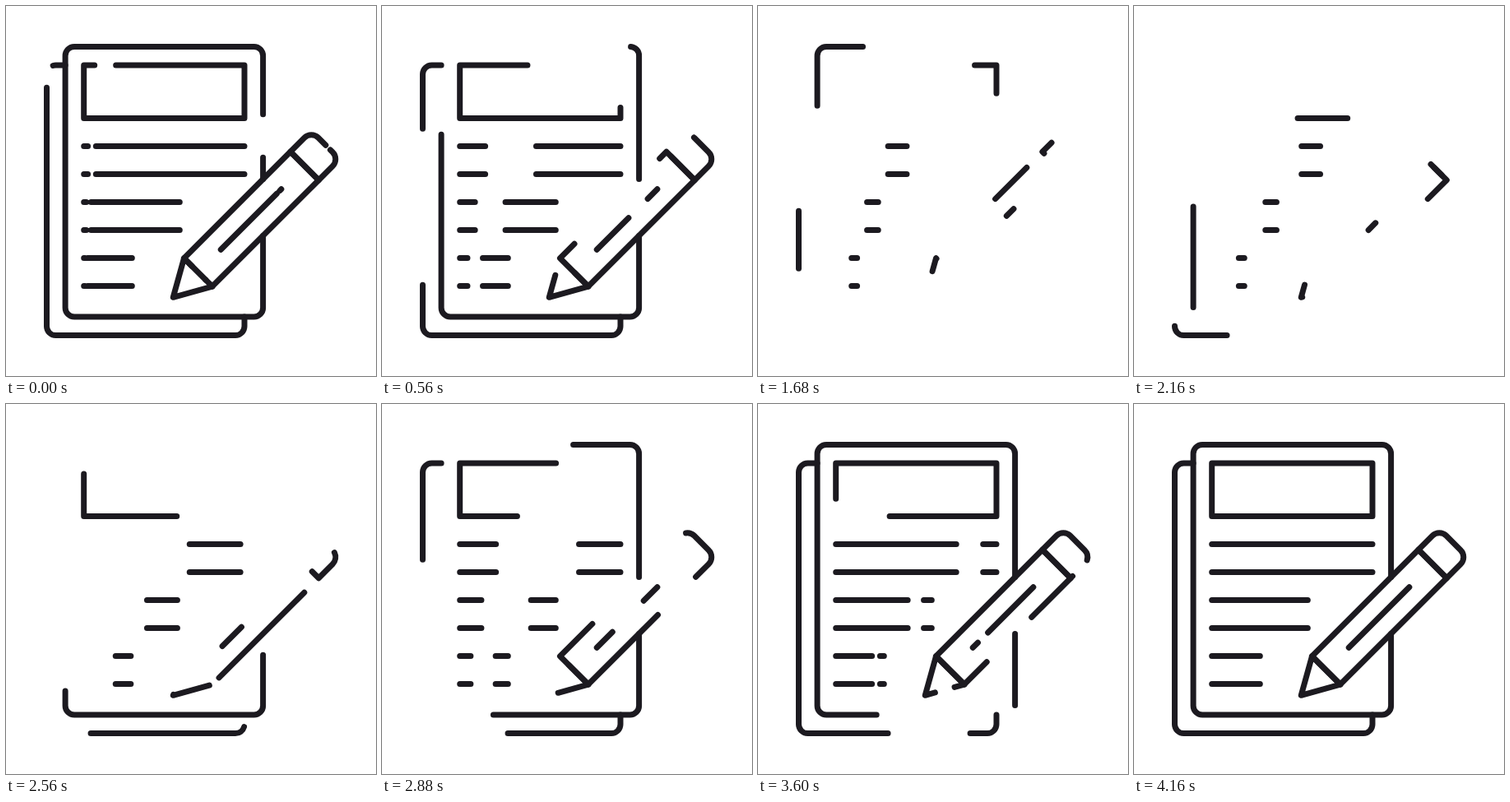
These frames come from a looping animation (450 by 450 pixels, 4.24 s). An HTML page with a canvas:

```html
<!DOCTYPE html>
<html lang="en">
<head>
<meta charset="utf-8">
<title>Document and pencil</title>
<style>
html, body { margin: 0; width: 100%; height: 100%; overflow: hidden; background: #fff; }
canvas { display: block; width: 450px; height: 450px; }
</style>
</head>
<body>
<canvas id="stage" width="450" height="450"></canvas>
<script>
const ctx = document.getElementById('stage').getContext('2d');
const LOOP = 4240, STEP = 80, FPS = 29.97, LEAD = 3, COUNT = 120;

// A stroke is a list of points [x, y, corner radius]; rounded corners are right angles.
function stroke(...pts) {
  const path = new Path2D();
  let length = 0;
  pts.forEach(([x, y, r = 0], i) => {
    if (!i) return path.moveTo(x, y);
    const [px, py] = pts[i - 1];
    length += Math.hypot(x - px, y - py) - r * (2 - Math.PI / 2);
    if (r) path.arcTo(x, y, pts[i + 1][0], pts[i + 1][1], r);
    else path.lineTo(x, y);
  });
  return { path, length };
}

// Point on the pencil, measured from its tip along and across the 45° axis
const tipX = 203.3, tipY = 354.3;
const pen = (along, across, r) =>
  [tipX + (along + across) / Math.SQRT2, tipY + (across - along) / Math.SQRT2, r];

function pencil() {
  const half = 24.3, neck = 43, band = 226, end = 262, r = 12;
  const tip = pen(0, 0), a = pen(neck, -half), b = pen(neck, half);
  const c = pen(band, -half), d = pen(band, half);
  const seam = pen(end, half - r);
  return [
    stroke(b, a, c, d, b),
    stroke(b, a, tip, b),
    stroke(seam, pen(end, -half, r), c, d, pen(end, half, r), seam),
    stroke(pen(186, 0), pen(82, 0))
  ];
}

// Both sheets and the header box are set apart by the same gap.
function sheets() {
  const gap = 22.6, r = 11;
  const left = 72.1, right = 312.6, top = 49.4, bottom = 378;
  const inLeft = left + gap, inRight = right - gap, inTop = top + gap;
  const outLeft = left - gap, outBottom = bottom + gap, boxBottom = 136.5;
  const axis = tipX + tipY - right, cut = 34.4;

  const rows = [1, 0.597, 0.3].flatMap((part, i) => [0, 1].map(k => {
    const y = 170.5 + 34 * (2 * i + k);
    return stroke([inLeft, y], [inLeft + (inRight - inLeft) * part, y]);
  }));
  return [
    stroke([right, axis - cut], [right, top, r], [left, top, r],
      [left, bottom, r], [right, bottom, r], [right, axis + cut]),
    stroke([left, inTop], [outLeft, inTop, r], [outLeft, outBottom, r],
      [inRight, outBottom, r], [inRight, bottom]),
    stroke([inLeft, inTop], [inRight, inTop], [inRight, boxBottom],
      [inLeft, boxBottom], [inLeft, inTop]),
    ...rows
  ];
}

const strokes = [...sheets(), ...pencil()];

function draw(ms) {
  const t = Math.floor((ms % LOOP) / STEP) * STEP;
  const n = Math.min(COUNT, LEAD + Math.floor(t * FPS / 1000));
  const u = n / COUNT;
  // The whole trim turns once while the line empties, then refills.
  const shown = Math.abs(1 - 2 * u);
  const start = u < 0.5 ? 3 * u : 1 + u;

  ctx.fillStyle = '#fff';
  ctx.fillRect(0, 0, 450, 450);
  if (!shown) return;
  ctx.strokeStyle = '#1c1a20';
  ctx.lineWidth = 7;
  ctx.lineCap = ctx.lineJoin = 'round';
  for (const { path, length } of strokes) {
    ctx.setLineDash(shown < 1 ? [shown * length, (1 - shown) * length] : []);
    ctx.lineDashOffset = -(start % 1) * length;
    ctx.stroke(path);
  }
}

const begin = performance.now();
function tick() {
  draw(performance.now() - begin);
  requestAnimationFrame(tick);
}
tick();
</script>
</body>
</html>
```
